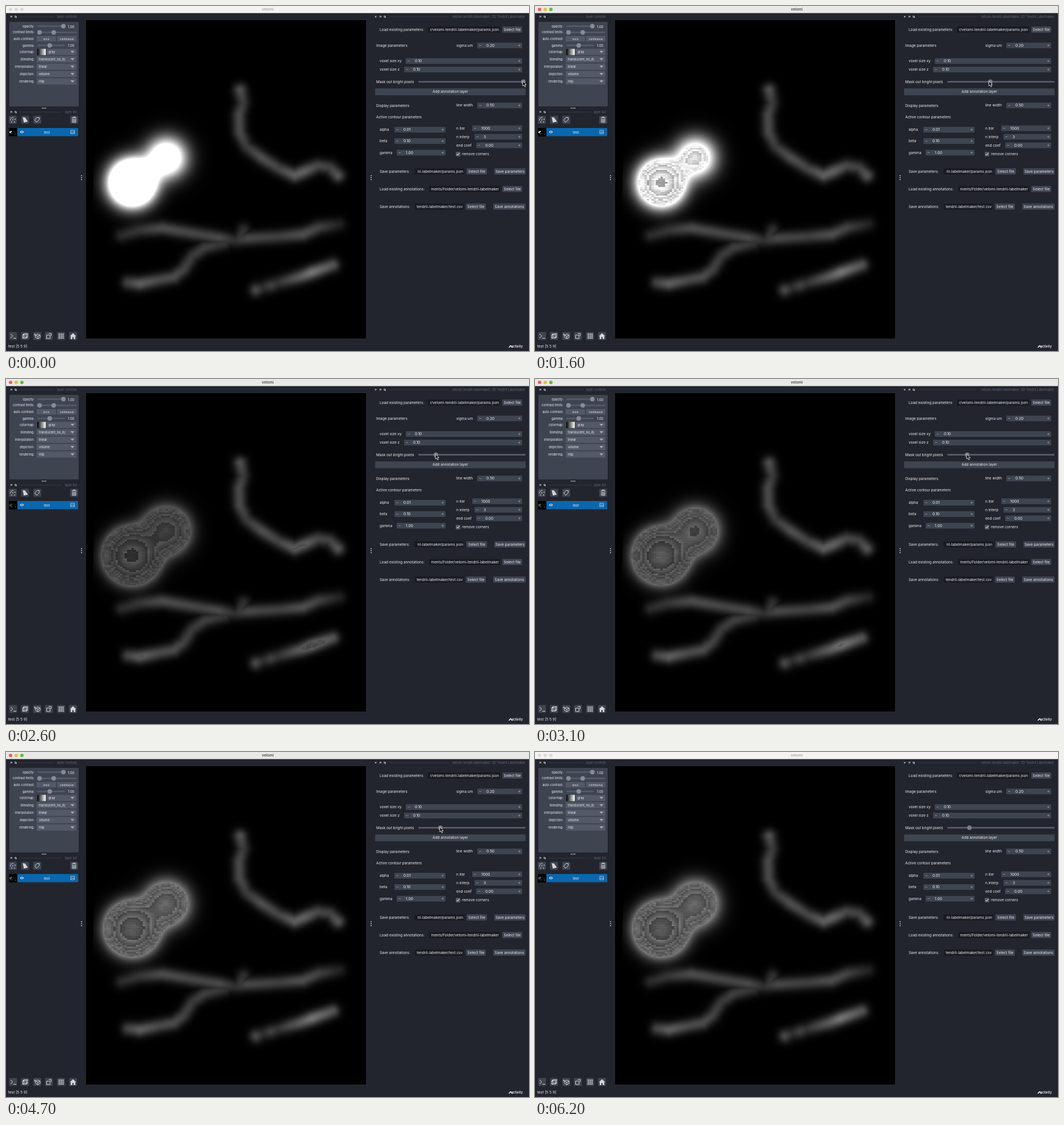
Write an HTML page with a canvas that moves like this. It is 921 px wide and 608 px high and loops after 6.3 s.

```html
<!DOCTYPE html>
<html lang="en">
<head>
<meta charset="utf-8">
<title>Volume viewer</title>
<style>
  html, body { margin: 0; width: 100%; height: 100%; overflow: hidden; background: #22252e; }
  svg, canvas { position: absolute; left: 0; top: 0; width: 921px; height: 608px; }
  text { font-family: Inter, "Open Sans", sans-serif; fill: #eef0f2; dominant-baseline: central; white-space: pre; }
</style>
</head>
<body>
<svg id="ui" viewBox="0 0 921 608"></svg>
<canvas id="view" width="921" height="608"></canvas>
<script>
const LOOP = 6300, STEP = 100;
const FIELD = '#3f4451', LIGHT = '#535967', INPUT = '#191b22', ICON = '#d3d6da', DIM = '#626772';

// ---------- interface helpers ----------
const parts = [];
const add = s => parts.push(s);
const rect = (x, y, w, h, fill, extra = '') =>
  add(`<rect x="${x}" y="${y}" width="${w}" height="${h}" fill="${fill}" ${extra}/>`);
const circle = (x, y, r, fill, extra = '') =>
  add(`<circle cx="${x}" cy="${y}" r="${r}" fill="${fill}" ${extra}/>`);
const path = (d, extra = `fill="none" stroke="${ICON}"`) => add(`<path d="${d}" ${extra}/>`);
const text = (x, y, s, size = 6.4, extra = '') =>
  add(`<text x="${x}" y="${y}" font-size="${size}" ${extra}>${s}</text>`);
const centered = (x, y, s, size, extra = '') => text(x, y, s, size, `text-anchor="middle" ${extra}`);
const button = (x1, x2, y, s, h = 11, size = 6.4) => {
  rect(x1, y - h / 2, x2 - x1, h, FIELD, 'rx="1"');
  centered((x1 + x2) / 2, y, s, size);
};
const input = (x1, x2, y, s) => {
  rect(x1, y - 5.5, x2 - x1, 11, INPUT, 'rx="1"');
  text(x2 - 2, y, s, 6.4, 'text-anchor="end"');
};
const spin = (labelX, x1, x2, y, label, value) => {
  text(labelX, y, label);
  rect(x1, y - 5, x2 - x1, 10, FIELD, 'rx="1"');
  path(`M${x1 + 3} ${y}h4M${x2 - 7} ${y}h4m-2 -2v4`, 'fill="none" stroke="#a0a4ad" stroke-width=".7"');
  text(x1 + 16, y, value, 6.7);
};
const track = (x1, x2, y, ...handles) => {
  rect(x1, y - 1.5, x2 - x1, 3, LIGHT, 'rx="1.5"');
  handles.forEach(x => circle(x, y, 4, '#878b96'));
};
const dots = (x, y, dx, dy) => [-1, 0, 1].forEach(k => circle(x + k * dx, y + k * dy, 0.9, ICON));
const dockIcons = (x, y) => {
  path(`M${x - 1} ${y + 1.5}l2 -3m-2.5 0.5h3v2`, `fill="none" stroke="${ICON}" stroke-width=".8"`);
  path(`M${x + 6.5} ${y - 1.5}h2v2h-2zM${x + 8} ${y - .5}h1.5v2h-2`, `fill="none" stroke="${ICON}" stroke-width=".7"`);
};
const dockLine = (x1, x2, y) => rect(x1, y - .3, x2 - x1, .6, '#434854');

// ---------- title bar ----------
rect(0, 0, 921, 608, '#22252e');
add('<rect id="bar" width="921" height="12.5"/>');
[8, 18, 28].forEach(x => circle(x, 6, 3, '#ddd', 'class="light"'));
centered(461, 6, 'velomi', 6.6, 'id="title" font-weight="600"');

// ---------- left dock ----------
dockIcons(9, 19);
dockLine(24, 86, 19);
text(125, 19, 'layer controls', 5.5, `text-anchor="end" style="fill:${DIM}"`);
rect(6, 28, 122, 149, FIELD, 'rx="1.5"');
[['opacity:', 35.5], ['contrast limits:', 46], ['auto-contrast:', 58], ['gamma:', 69.5], ['colormap:', 81],
 ['blending:', 94], ['interpolation:', 107], ['depiction:', 120], ['rendering:', 133]]
  .forEach(([s, y]) => text(50, y, s, 5.5, 'text-anchor="end"'));
track(55, 104, 35.5, 101);
text(109, 36, '1.00', 5.8);
track(55, 124, 46.5, 59, 84);
[[54, 88, 'once'], [90, 124, 'continuous']].forEach(([a, b, s]) => {
  rect(a, 53, b - a, 9.5, LIGHT, 'rx="1"');
  centered((a + b) / 2, 57.7, s, 4.7);
});
track(55, 104, 69.5, 77);
text(109, 69.5, '1.00', 5.8);
const combo = (x, y, s) => {
  rect(x, y - 5.5, 124 - x, 11, LIGHT, 'rx="1"');
  text(x + 4, y, s, 5.5);
  path(`M113.5 ${y - 2}h7l-3.5 4z`, 'fill="#a5a9b2"');
};
add('<defs><linearGradient id="ramp"><stop stop-color="#000"/><stop offset="1" stop-color="#fff"/></linearGradient></defs>');
rect(55, 75.5, 15, 11, 'url(#ramp)');
combo(71, 81, 'gray');
combo(54, 94, 'translucent_no_d(');
combo(54, 107, 'linear');
combo(54, 120, 'volume');
combo(54, 133, 'mip');
dots(67, 180, 3, 0);
dockIcons(9, 187);
dockLine(24, 99, 187);
text(125, 187, 'layer list', 5.5, `text-anchor="end" style="fill:${DIM}"`);

const box = (x, y) => rect(x - 7, y - 7, 14, 14, FIELD, 'rx="1.5"');
[12, 33.5, 55, 120].forEach(x => box(x, 200.5));
[[-4, 0], [0, -4], [0, 0], [4, -1], [-2, 4], [3, 4], [-3, -3]].forEach(([x, y]) => circle(12 + x, 200.5 + y, .9, ICON));
path('M29.5 196l4 .5 5 7 -7 2z', `fill="${ICON}"`);
path('M50.5 201l4 -4.5h4v4l-4.5 4.5z');
path('M116 197h8M118.5 197v-1.5h3v1.5M117 198.5v6.5h6v-6.5M119 199v5M121 199v5');
rect(20, 215, 107, 14.5, '#0a67ad');
path('M24.5 222q3.500 -4.500 7 0q-3.500 4.500 -7 0z', `fill="${ICON}"`);
circle(28, 222, 1.2, '#0a67ad');
centered(72, 222.5, 'test', 6);
path('M114 219h6.500v6h-6.500zM114.500 224l2 -2.500 1.500 1.500 1 -1 1.500 2', `fill="none" stroke="${ICON}" stroke-width=".8"`);

[12.5, 33.5, 55, 75.5, 97, 118].forEach(x => box(x, 581.5));
path('M8 578l4 3.500 -4 3.500M13 585.500h5');
path('M29.5 579.500l2 -2h6.500v6l-2 2h-6.500zM29.500 579.500h6.500v6M36 579.500l2 -2M31.500 577.500v6h6.500M31.500 583.500l-2 2');
path('M52 580l4 -2 4 2v4l-4 2.500 -4 -2.500zM52 580l4 2 4 -2M56 582v4M51 577l-1 3 2 -1');
path('M71.5 580h6v6h-6zM75 577h4.500v4.500');
for (let i = 0; i < 9; i++) rect(92.7 + i % 3 * 3.3, 577.3 + Math.floor(i / 3) * 3.3, 2.2, 2.2, ICON);
path('M112.500 582l5.500 -5.500 5.500 5.500h-1.500v5h-2.700v-3.500h-2.600v3.500h-2.700v-5z', `fill="${ICON}"`);
text(4, 600, 'test [5 5 9]', 6.5);
path('M885.500 602l3 -3.500 3 3.500', 'fill="none" stroke="#fff" stroke-width="1.400"');
text(910, 600, 'activity', 5.6, 'text-anchor="end" font-weight="600"');
dots(133, 302.500, 0, 3.500);
dots(643, 302.500, 0, 3.500);

// ---------- right dock ----------
path('M649.800 17.500l2.500 2.500m0 -2.500l-2.500 2.500');
dockIcons(659, 19);
dockLine(675, 780, 19);
text(914, 19, 'velomi-tendril-labelmaker: 3D Tendril Labelmaker', 5.5, `text-anchor="end" style="fill:${DIM}"`);
text(658, 41.5, 'Load existing parameters:');
input(743, 870, 41.5, 'r/velomi-tendril-labelmaker/params.json');
button(874, 909, 41.5, 'Select file');
text(652, 70, 'Image parameters');
spin(793, 830, 909, 69.5, 'sigma um', '0.20');
spin(658, 704, 909, 97, 'voxel size xy', '0.10');
spin(658, 701, 909, 112, 'voxel size z', '0.10');
text(652, 133.5, 'Mask out bright pixels');
track(726, 915, 133.5);
circle(911, 133.5, 4, '#777c88', 'id="handle"');
button(650, 915, 151.3, 'Add annotation layer', 12);
text(652, 175.5, 'Display parameters');
spin(793, 830, 909, 175.3, 'line width', '0.50');
text(652, 196, 'Active contour parameters');
spin(658, 684, 774, 218, 'alpha', '0.01');
spin(658, 684, 774, 238, 'beta', '0.10');
spin(658, 688, 774, 258.5, 'gamma', '1.00');
spin(793, 821, 909, 215.5, 'n iter', '1000');
spin(793, 825, 909, 230.5, 'n interp', '3');
spin(793, 828, 909, 245.5, 'end coef', '0.00');
rect(792, 257, 8, 8, LIGHT, 'rx="1"');
path('M793.700 261l1.700 2 3 -4', 'fill="none" stroke="#fff"');
text(803, 261, 'remove corners');
text(658, 291.5, 'Save parameters:');
input(719, 807, 291.5, 'ril-labelmaker/params.json');
button(811, 847, 291.5, 'Select file');
button(860, 915, 291.5, 'Save parameters');
text(658, 322.5, 'Load existing annotations:');
input(745, 870, 322.5, 'ments/Folder/velomi-tendril-labelmaker');
button(874, 909, 322.5, 'Select file');
text(658, 353.5, 'Save annotations:');
input(720, 806, 353.5, 'tendril-labelmaker/test.csv');
button(810, 845, 353.5, 'Select file');
button(858, 915, 353.5, 'Save annotations');
path('M0 0v8.500l2 -1.800 1.500 3.300 1.500 -.700 -1.500 -3.200h2.700z', 'id="cursor" fill="#000" stroke="#fff" stroke-width=".8"');

const ui = document.getElementById('ui');
ui.innerHTML = parts.join('');
const $ = id => document.getElementById(id);
const lights = [...document.querySelectorAll('.light')];

// ---------- volume ----------
const X0 = 141, Y0 = 25, W = 493, H = 561;
const SIGMA = 23.3, SLICE = 6.5;
const blobs = [[222, 311, 4.8], [282, 267, 1.76]];
// Each filament point: x, y, brightness
const filaments = [
  [[412, 148, .3], [417, 170, .22], [410, 192, .28], [411, 222, .28], [423, 247, .22], [450, 267, .3],
   [480, 286, .26], [508, 298, .36], [525, 291, .37], [548, 281, .27], [570, 284, .25], [584, 298, .32]],
  [[203, 404, .16], [235, 395, .2], [275, 391, .29], [340, 402, .26], [375, 408, .28], [402, 413, .18],
   [425, 409, .27], [480, 406, .24], [522, 402, .3], [550, 390, .25], [586, 384, .13]],
  [[418, 394, .18], [412, 409, .22]],
  [[385, 417, .2], [350, 425, .24], [328, 440, .22], [312, 464, .25], [295, 477, .29], [270, 482, .28],
   [235, 489, .36], [215, 487, .26]],
  [[440, 500, .27], [452, 496, .17], [466, 492, .24], [478, 488, .19], [520, 476, .36], [538, 469, .45], [575, 456, .32]],
];

function filamentLight(x, y) {
  let best = 0;
  for (const line of filaments) {
    for (let i = 1; i < line.length; i++) {
      const [ax, ay, a] = line[i - 1], [bx, by, b] = line[i];
      const dx = bx - ax, dy = by - ay;
      const u = Math.max(0, Math.min(1, ((x - ax) * dx + (y - ay) * dy) / (dx * dx + dy * dy)));
      const d2 = (x - ax - u * dx) ** 2 + (y - ay - u * dy) ** 2;
      if (d2 < 900) best = Math.max(best, (a + (b - a) * u) * Math.exp(-d2 / 150));
    }
  }
  return best;
}

const field = new Float32Array(W * H);
for (let j = 0; j < H; j++) {
  for (let i = 0; i < W; i++) {
    const x = X0 + i, y = Y0 + j;
    let v = filamentLight(x, y);
    for (const [cx, cy, peak] of blobs) {
      v += peak * Math.exp(-((x - cx) ** 2 + (y - cy) ** 2) / (2 * SIGMA * SIGMA));
    }
    field[j * W + i] = x < 155 - (y - 270) / 27 ? v * .2 : v;
  }
}

const hash = (a, b) => {
  const s = Math.sin(a * 127.1 + b * 311.7) * 43758.5453;
  return s - Math.floor(s);
};

// Brightest voxel left in a column once everything above the limit is removed
function maskedLight(i, j, limit) {
  const bi = Math.floor(i / 4), bj = Math.floor(j / 3);
  const v = field[Math.min(H - 1, bj * 3 + 1) * W + Math.min(W - 1, bi * 4 + 2)];
  if (v <= limit) return Math.min(field[j * W + i], limit);
  const depth = SIGMA * Math.sqrt(2 * Math.log(v / limit));
  const z = Math.ceil(depth / SLICE) * SLICE;
  const grain = .88 + .12 * hash(Math.floor(bi / 2), bj);
  return v * Math.exp(-z * z / (2 * SIGMA * SIGMA)) * grain * (j % 3 ? 1 : .92);
}

const ctx = $('view').getContext('2d');
const image = ctx.createImageData(W, H);
function drawVolume(limit) {
  const px = image.data;
  for (let j = 0, k = 0; j < H; j++) {
    for (let i = 0; i < W; i++, k++) {
      const v = field[k] < limit * .7 ? field[k] : maskedLight(i, j, limit);
      px[4 * k] = px[4 * k + 1] = px[4 * k + 2] = v * 255;
      px[4 * k + 3] = 255;
    }
  }
  ctx.putImageData(image, X0, Y0);
  ctx.drawImage(ctx.canvas, X0, Y0, W, H, 5, 215, 14.5, 14.5);
}

// ---------- timeline ----------
const keys = [[0, 911], [700, 911], [1600, 802], [2400, 757], [2600, 757], [3100, 761], [3800, 765], [LOOP, 765]];
function handleAt(t) {
  const n = Math.max(1, keys.findIndex(k => k[0] >= t));
  const [t0, x0] = keys[n - 1], [t1, x1] = keys[n];
  return x0 + (x1 - x0) * (t - t0) / (t1 - t0);
}

let shownX, shownT;
function render(t) {
  const x = handleAt(t), active = t >= 700 && t < 6100;
  $('handle').setAttribute('cx', x);
  $('cursor').setAttribute('transform', `translate(${handleAt(Math.min(t + 30, LOOP)) - 1} 132.5)`);
  $('cursor').style.display = t < 6100 ? '' : 'none';
  $('bar').setAttribute('fill', active ? '#e8e8e7' : '#f4f3f1');
  $('title').style.fill = active ? '#4a4a4a' : '#aaa';
  lights.forEach((c, i) => c.setAttribute('fill', active ? ['#fc5b57', '#e5bf3c', '#57c038'][i] : '#dbdad8'));
  if (x !== shownX) drawVolume(x >= 911 ? Infinity : .35 + (x - 757) * .0167);
  shownX = x;
}

const start = performance.now();
function tick() {
  const t = Math.floor((performance.now() - start) % LOOP / STEP) * STEP;
  if (t !== shownT) render(shownT = t);
  requestAnimationFrame(tick);
}
tick();
</script>
</body>
</html>
```
